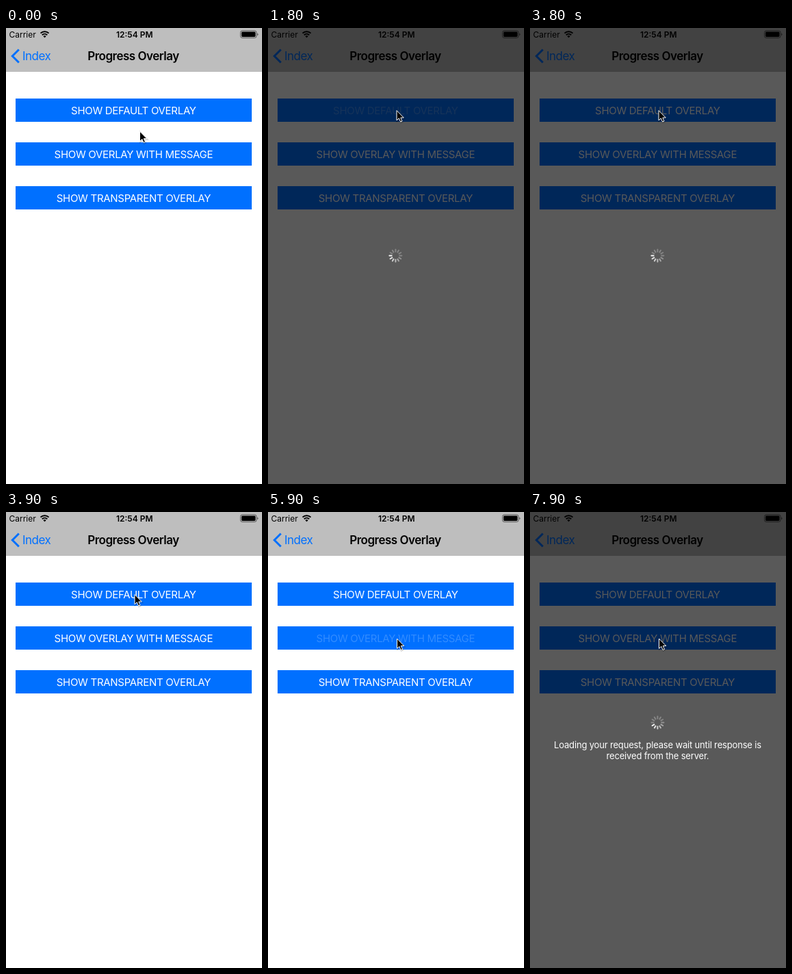
Write an HTML page that moves like this. It is 374 px wide and 666 px high and loops after 8000 ms.

```html
<!DOCTYPE html>
<html lang="en">
<head>
<meta charset="utf-8">
<title>Progress Overlay</title>
<style>
  html, body { margin: 0; width: 100%; height: 100%; overflow: hidden; background: #fff; }
  svg { display: block; width: 374px; height: 666px; font-family: Inter, Roboto, sans-serif; }
  .status { font-size: 12px; }
  .nav { font-size: 17px; letter-spacing: -.5px; }
  .bold { font-weight: 600; }
  .label { font-size: 15px; letter-spacing: -.3px; fill: #fff; text-anchor: middle; }
  .message { font-size: 13px; letter-spacing: -.17px; fill: #fff; text-anchor: middle; }
</style>
</head>
<body>
<svg viewBox="0 0 374 666">
  <rect width="374" height="666" fill="#fff"/>
  <rect width="374" height="63.5" fill="#bebebe"/>
  <rect y="63.5" width="374" height=".5" fill="#999"/>

  <text class="status" x="4.5" y="13.5">Carrier</text>
  <g fill="none" stroke="#000" stroke-width="2">
    <path d="M50.5 7.6a8.6 8.6 0 0 1 12 0"/>
    <path d="M52.8 10.2a5.3 5.3 0 0 1 7.4 0"/>
  </g>
  <path d="M56.5 14.2l-2.1-2.2a3 3 0 0 1 4.2 0z"/>
  <text class="status bold" x="187.7" y="13.5" text-anchor="middle">12:54 PM</text>
  <rect x="342.5" y="4" width="23.5" height="10.4" rx="2.6" fill="none" stroke="#555" stroke-width="1"/>
  <rect x="344" y="5.5" width="20.5" height="7.4" rx="1.4"/>
  <path d="M367.2 7.4a2 2 0 0 1 0 3.7z" fill="#555"/>

  <path d="M18.8 31.5L9.3 41l9.5 9.5" fill="none" stroke="#0070ff" stroke-width="3"/>
  <text class="nav" x="24" y="47" fill="#0070ff">Index</text>
  <text class="nav bold" x="186" y="47" text-anchor="middle">Progress Overlay</text>

  <g id="buttons"></g>

  <g id="overlay">
    <rect width="374" height="666" fill="#000" fill-opacity=".65"/>
    <g id="spinner" stroke="#fff" stroke-width="2" stroke-linecap="round"></g>
    <g id="message">
      <text class="message" x="186.5" y="345">Loading your request, please wait until response is</text>
      <text class="message" x="186.5" y="360.5">received from the server.</text>
    </g>
  </g>

  <g id="cursor">
    <path d="M0 0V14.4L3.3 11.3L5.6 16.5L8 15.5L5.8 10.5H10.3Z" transform="translate(.6 1.2)"
          fill="#000" stroke="#000" stroke-width="2" opacity=".16"/>
    <path d="M0 0V14.4L3.3 11.3L5.6 16.5L8 15.5L5.8 10.5H10.3Z" stroke="#fff" stroke-width="1"/>
  </g>
</svg>
<script>
  const LOOP = 8000, STEP = 100, TICKS = 12, DIM = .2;
  const $ = id => document.getElementById(id);

  // One entry per tap: button index, press time, overlay interval, spinner centre
  const taps = [
    { button: 0, press: 1500, show: 1800, hide: 3900, y: 332.5, message: false },
    { button: 1, press: 5800, show: 6000, hide: LOOP, y: 307.5, message: true }
  ];

  // time, x, y of the pointer tip
  const path = [
    [0, 195.5, 151], [500, 189, 123.5], [900, 189, 123.5], [1100, 188, 120.5],
    [4300, 188, 120.5], [5200, 188.5, 184.5], [5300, 188.5, 185], [LOOP, 188.5, 185]
  ];

  function add(parent, name, attrs) {
    const el = document.createElementNS(parent.namespaceURI, name);
    for (const key in attrs) el.setAttribute(key, attrs[key]);
    return parent.appendChild(el);
  }

  const labels = ['DEFAULT OVERLAY', 'OVERLAY WITH MESSAGE', 'TRANSPARENT OVERLAY'].map((name, i) => {
    const y = 103 + 64 * i;
    add($('buttons'), 'rect', { x: 14, y, width: 345, height: 34, fill: '#0070ff' });
    const label = add($('buttons'), 'text', { class: 'label', x: 186.4, y: y + 22.5 });
    label.textContent = 'SHOW ' + name;
    return label;
  });

  const ticks = Array.from({ length: TICKS }, (_, i) =>
    add($('spinner'), 'line', { y1: -5.8, y2: -9, transform: `rotate(${i * 360 / TICKS})` }));

  const clamp = v => Math.min(1, Math.max(0, v));
  const ease = v => v * v * (3 - 2 * v);

  function pointer(t) {
    const i = path.findIndex(p => p[0] > t);
    const [a, b] = [path[i - 1], path[i]];
    const k = ease((t - a[0]) / (b[0] - a[0]));
    return [1, 2].map(n => a[n] + (b[n] - a[n]) * k);
  }

  function labelAlpha(t, tap) {
    if (t < tap.press) return 1;
    return DIM + (1 - DIM) * ease(clamp((t - tap.show + 100) / 800));
  }

  function draw(t) {
    $('cursor').setAttribute('transform', `translate(${pointer(t)})`);
    for (const tap of taps) labels[tap.button].setAttribute('fill-opacity', labelAlpha(t, tap));

    const tap = taps.find(p => t >= p.show && t < p.hide);
    $('overlay').style.display = tap ? '' : 'none';
    if (!tap) return;
    $('message').style.display = tap.message ? '' : 'none';
    $('spinner').setAttribute('transform', `translate(186.4 ${tap.y})`);
    const head = 9 + Math.round((t - tap.show) / 1000 * TICKS);
    ticks.forEach((tick, i) => {
      const lag = (head - i + TICKS) % TICKS;
      tick.setAttribute('stroke-opacity', Math.max(.27, .95 - lag * .12));
    });
  }

  const start = performance.now();
  function frame() {
    const t = (performance.now() - start) % LOOP;
    draw(Math.floor(t / STEP) * STEP);
    requestAnimationFrame(frame);
  }
  frame();
</script>
</body>
</html>
```
